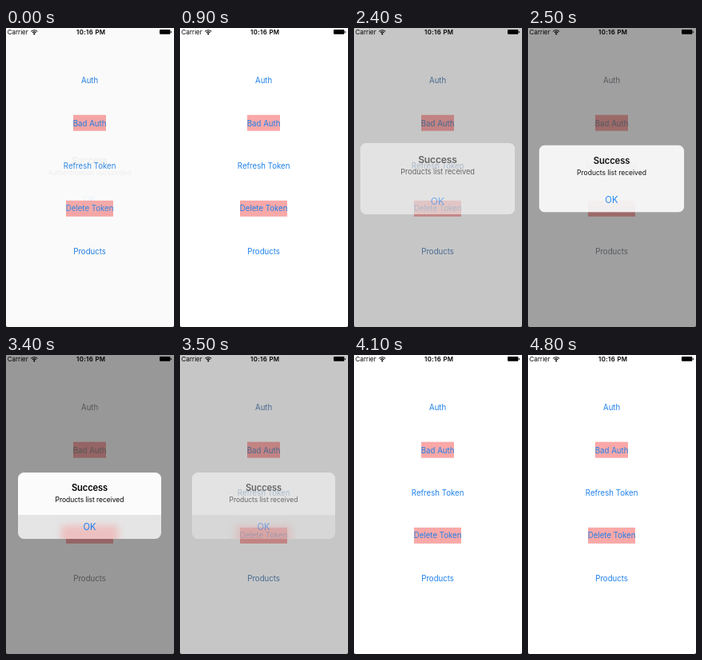
Recreate the animation shown at these times as an HTML page. Size 210 px wide and 374 px high, loop 5100 ms.

```html
<!DOCTYPE html>
<html lang="en">
<head>
<meta charset="utf-8">
<title>Alert demo</title>
<style>
  html, body { margin: 0; width: 100%; height: 100%; overflow: hidden; background: #fff; }
  svg { display: block; width: 100%; height: 100%; }
  text { font-family: Inter, Roboto, sans-serif; }
  .mid { text-anchor: middle; }
  .bar { font-size: 7.9px; }
  .clock { font-weight: 600; letter-spacing: .33px; }
  .button { font-size: 9.7px; letter-spacing: -.02px; }
  .title { font-size: 11.15px; font-weight: 600; letter-spacing: -.12px; }
  .message { font-size: 8.5px; letter-spacing: -.04px; }
  .ok { font-size: 11.15px; fill: #1680f5; }
</style>
</head>
<body>
<svg viewBox="0 0 210 374">
  <defs>
    <clipPath id="panelClip"><rect x="15" y="147" width="179" height="83" rx="7.5"/></clipPath>
    <filter id="soft" x="-30%" y="-80%" width="160%" height="260%"><feGaussianBlur stdDeviation="4"/></filter>
  </defs>
  <rect width="210" height="374" fill="#fff"/>
  <g fill="#faa8a8">
    <rect x="84" y="108.7" width="41" height="20"/>
    <rect x="75" y="215.8" width="59" height="20"/>
  </g>
  <g id="buttons"></g>

  <text class="bar" x="1.8" y="7.8">Carrier</text>
  <g fill="none" stroke="#000" stroke-width="1.1">
    <path d="M31.4 4.3a5.5 5.5 0 0 1 7.8 0M33.1 5.9a3.2 3.2 0 0 1 4.4 0"/>
    <circle cx="35.3" cy="7.4" r=".5"/>
  </g>
  <text class="bar clock mid" x="106.2" y="7.8">10:16 PM</text>
  <rect x="192" y="2" width="13.4" height="5.8" rx="1"/>
  <rect x="205.9" y="3.9" width="1" height="2" rx=".5"/>
  <path d="M0 372v2h2q-2 0-2-2zM210 372v2h-2q2 0 2-2z" fill="#333"/>

  <rect id="dim" width="210" height="374"/>
  <g id="alert">
    <g id="panel" clip-path="url(#panelClip)">
      <rect x="15" y="147" width="179" height="83" fill="#fbfbfb"/>
      <g id="press">
        <rect x="15" y="200" width="179" height="30" fill="#e5e5e5"/>
        <rect x="69" y="213" width="71" height="24" fill="#f49c9c" opacity=".5" filter="url(#soft)"/>
      </g>
    </g>
    <g id="words" class="mid">
      <text class="title" x="104.5" y="170.4">Success</text>
      <text id="message" class="message" x="104.5" y="183.8"></text>
      <text class="ok" x="104.5" y="219">OK</text>
    </g>
  </g>
</svg>
<script>
const LOOP = 5100, STEP = 100;
const BLUE = [30, 128, 236], GREY = [142, 142, 142];
const CX = 104.5, CY = 188.5;
const $ = id => document.getElementById(id);

["Auth", "Bad Auth", "Refresh Token", "Delete Token", "Products"].forEach((label, i) => {
  const el = document.createElementNS("http://www.w3.org/2000/svg", "text");
  el.setAttribute("class", "button mid");
  el.setAttribute("x", 104.6);
  el.setAttribute("y", 69.4 + 53.3 * i);
  el.textContent = label;
  $("buttons").append(el);
});

const fadeOut = (t, start) => .55 * Math.pow(.3, (t - start) / 100);

// How far the alert is shown, 0 to 1
function presence(t) {
  if (t < 900) return fadeOut(t, -200);
  if (t < 2300) return 0;
  if (t < 2400) return .05;
  if (t < 2500) return .55;
  if (t < 3500) return 1 - .08 * Math.pow(.3, (t - 2500) / 100);
  return t < 4300 ? fadeOut(t, 3500) : 0;
}

function draw(time) {
  const t = Math.floor((time % LOOP) / STEP) * STEP;
  const p = presence(t);
  const opening = t >= 2300 && t < 3300;
  const scale = opening ? 1 + .18 * (1 - p) : 1;
  const tint = BLUE.map((c, i) => Math.round(c + (GREY[i] - c) * p));

  $("buttons").setAttribute("fill", `rgb(${tint})`);
  $("dim").setAttribute("opacity", .405 * p);
  $("panel").setAttribute("opacity", p);
  $("words").setAttribute("opacity", p);
  $("press").setAttribute("opacity", t >= 3300 && t < 3600 ? 1 : 0);
  $("message").textContent = t < 2000 ? "Authentication succeeded" : "Products list received";
  $("alert").setAttribute("visibility", p < .004 ? "hidden" : "visible");
  $("alert").setAttribute("transform",
    `translate(${CX} ${CY}) scale(${scale}) translate(${-CX} ${-CY})`);
}

const start = performance.now();
function tick(now) {
  draw(Math.max(0, now - start));
  requestAnimationFrame(tick);
}
draw(0);
requestAnimationFrame(tick);
</script>
</body>
</html>
```
